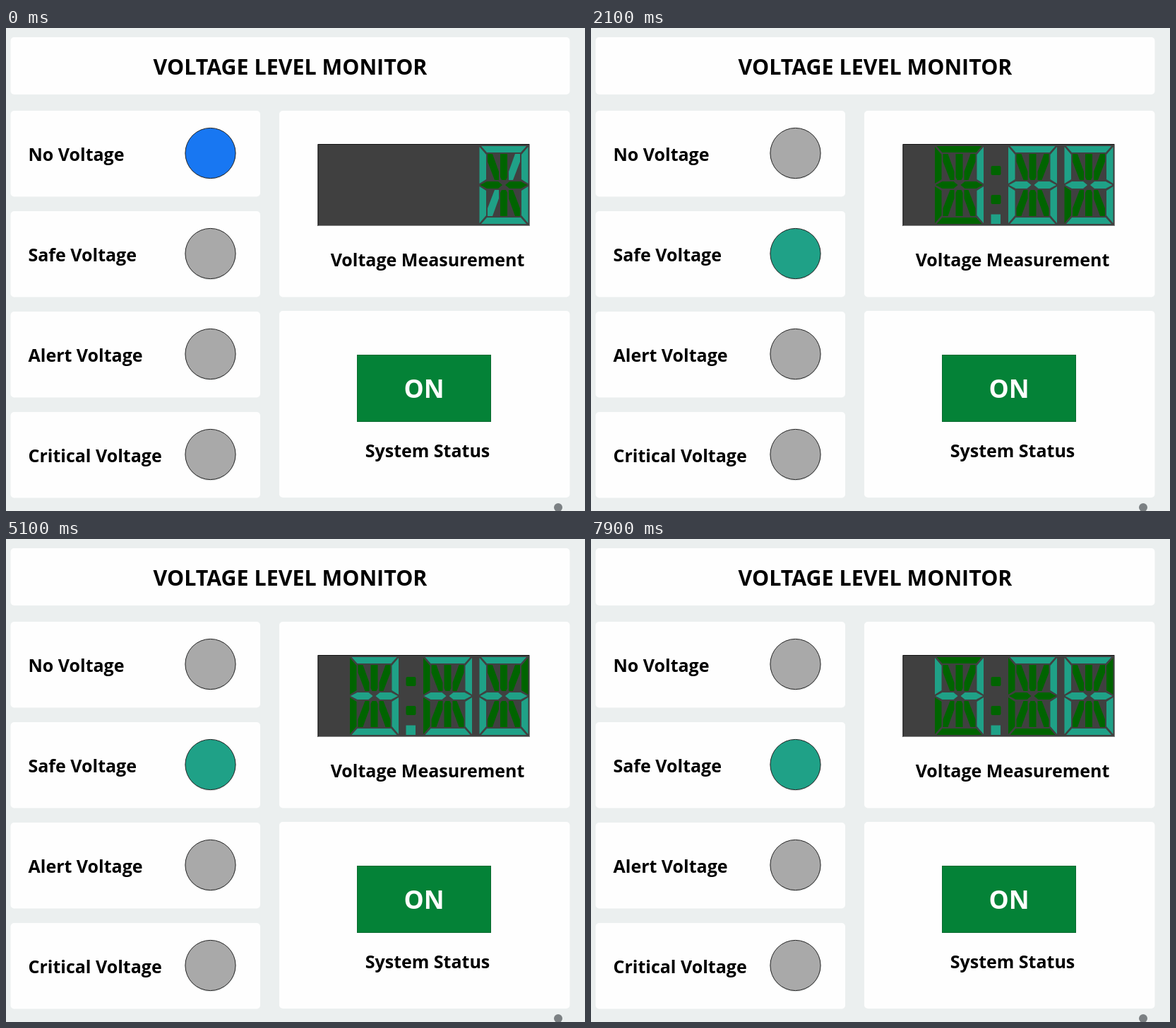
Recreate the animation shown at these times as an HTML page. Size 820 by 683 pixels, loop 8 s.

```html
<!DOCTYPE html>
<html lang="en">
<head>
<meta charset="utf-8">
<title>Voltage level monitor</title>
<style>
  html, body { margin: 0; width: 100%; height: 100%; overflow: hidden; background: #ebefef; }
  svg { display: block; width: 820px; height: 683px; }
  text { font: 700 25px "Open Sans", "Noto Sans", sans-serif; fill: #000; }
  .mid { text-anchor: middle; }
  .card { fill: #fefefe; }
</style>
</head>
<body>
<svg id="stage" viewBox="0 0 820 683"></svg>
<script>
const LOOP = 8000;
const OFF = '#a9a9a9', BLUE = '#1877f2', TEAL = '#1fa187', DIM = '#006400';

// [start time, reading]
const STEPS = [
  [0, '0'], [1100, '0.88'], [2100, '1.89'], [2900, '1.84'],
  [4100, '2.88'], [5100, '3.36'], [6100, '4.04'], [7100, '4.76']
];

// Segment outlines around the centre of a digit
const BAR = [[-32, -55], [32, -55], [24, -46], [-24, -46]];
const SIDE = [[-34.5, -54], [-25, -43], [-25, -8], [-34.5, -2]];
const DASH = [[-33.5, 0], [-24, -5], [-8, -5], [-2, 0], [-8, 5], [-24, 5]];
const SLANT = [[-23, -44], [-16, -44], [-7, -19], [-7, -7], [-13, -7], [-23, -33]];
const POST = [[-5, -44], [5, -44], [5, -11], [3, -7], [-3, -7], [-5, -11]];

// name: [outline, x flip, y flip]
const SEGMENTS = {
  a: [BAR, 1, 1], d: [BAR, 1, -1],
  f: [SIDE, 1, 1], b: [SIDE, -1, 1], e: [SIDE, 1, -1], c: [SIDE, -1, -1],
  g: [DASH, 1, 1], h: [DASH, -1, 1],
  i: [SLANT, 1, 1], j: [SLANT, -1, 1], k: [SLANT, 1, -1], l: [SLANT, -1, -1],
  m: [POST, 1, 1], n: [POST, 1, -1]
};
const GLYPHS = ['abcdefjk', 'bc', 'abdegh', 'abcdgh', 'bcfgh',
                'acdfgh', 'acdefgh', 'abc', 'abcdefgh', 'abcdfgh'];

const stage = document.getElementById('stage');

function add(tag, attrs, parent = stage) {
  const el = document.createElementNS('http://www.w3.org/2000/svg', tag);
  for (const key in attrs) el.setAttribute(key, attrs[key]);
  return parent.appendChild(el);
}

const rect = (x, y, width, height, attrs, parent) =>
  add('rect', { x, y, width, height, ...attrs }, parent);

const card = (x, y, w, h) => rect(x, y, w, h, { rx: 5, class: 'card' });

function label(str, x, y, cls = 'mid', style = '') {
  add('text', { x, y, class: cls, style }).textContent = str;
}

function lamp(name, row) {
  const y = 142 * row;
  card(6.5, 117 + y, 353.5, 121.5);
  label(name, 31.5, 188 + y, '');
  add('circle', { cx: 289.5, cy: 178.5 + y, r: 36, fill: '#e9ebeb' });
  return add('circle', { cx: 289.5, cy: 177 + y, r: 35.6, fill: OFF, stroke: '#222', 'stroke-width': 1 });
}

function digit(cx) {
  const group = add('g', { transform: `translate(${cx} 222)` });
  const parts = {};
  for (const name in SEGMENTS) {
    const [shape, sx, sy] = SEGMENTS[name];
    const points = shape.map(([x, y]) => [x * sx, y * sy]).join(' ');
    parts[name] = add('polygon', { points }, group);
  }
  return char => {
    group.style.display = char ? '' : 'none';
    if (!char) return;
    for (const name in parts)
      parts[name].setAttribute('fill', GLYPHS[char].includes(name) ? TEAL : DIM);
  };
}

// Panels
card(6.5, 13, 792, 81);
label('VOLTAGE LEVEL MONITOR', 402.5, 66, 'mid', 'font-size:30.4px');
const lamps = ['No Voltage', 'Safe Voltage', 'Alert Voltage', 'Critical Voltage'].map(lamp);
card(387, 117, 411.5, 263.5);
card(387, 400, 411.5, 264);
label('Voltage Measurement', 597, 337);
label('System Status', 597, 606.5);

// Button
rect(497.5, 462.5, 189, 94, { fill: '#048237', stroke: '#0a6a30' });
label('ON', 592, 522.5, 'mid', 'font-size:35.5px;fill:#fefefe');

// Display
rect(441.5, 164, 300, 116, { fill: '#404040' });
add('path', { d: 'M442 280V164.5H741', fill: 'none', stroke: '#111' });
add('path', { d: 'M442 279.5H741.5V165', fill: 'none', stroke: '#8a8a8a' });
const digits = [521.5, 625.5, 705].map(digit);
const point = add('g', {});
rect(566.5, 195, 14, 13, { rx: 2, fill: DIM }, point);
rect(566.5, 236, 14, 13, { rx: 2, fill: DIM }, point);
rect(566.5, 263.5, 13.5, 13.5, { fill: TEAL }, point);

add('circle', { cx: 782, cy: 678, r: 6, fill: '#7b8083' });

function show(reading) {
  const chars = reading.replace('.', '').padStart(3);
  digits.forEach((set, i) => set(chars[i].trim()));
  point.style.display = reading.includes('.') ? '' : 'none';
  const live = Number(reading) > 0;
  lamps[0].setAttribute('fill', live ? OFF : BLUE);
  lamps[1].setAttribute('fill', live ? TEAL : OFF);
}

let shown;
function tick() {
  const t = performance.now() % LOOP;
  const reading = STEPS.filter(([start]) => start <= t).pop()[1];
  if (reading !== shown) show(shown = reading);
  requestAnimationFrame(tick);
}
tick();
</script>
</body>
</html>
```
